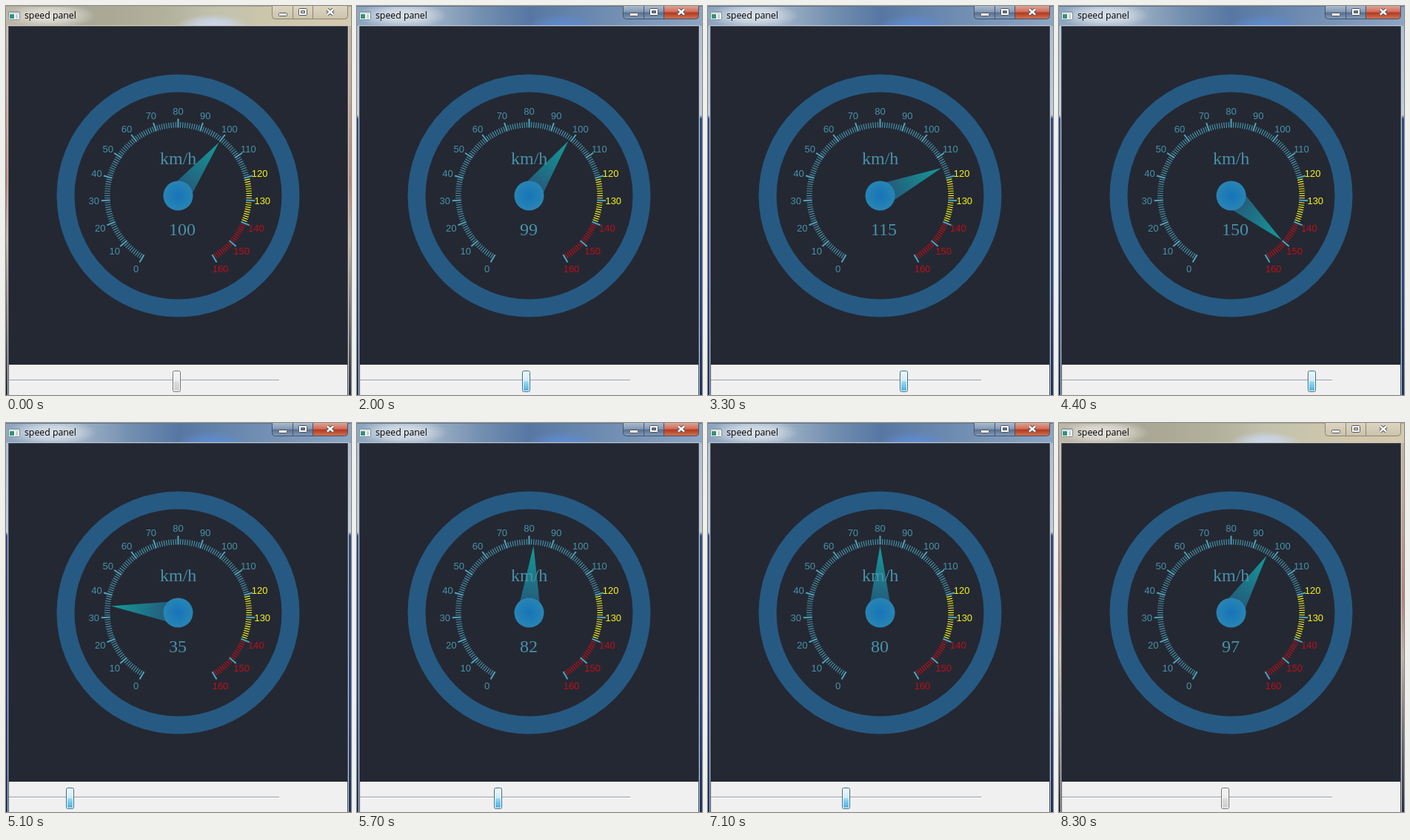
Recreate the animation shown at these times as an HTML page with a canvas. Size 466 px wide and 526 px high, loop 8400 ms.

```html
<!DOCTYPE html>
<html lang="en">
<head>
<meta charset="utf-8">
<title>speed panel</title>
<style>
  html, body { margin: 0; width: 466px; height: 526px; overflow: hidden; }
  canvas { display: block; }
</style>
</head>
<body>
<canvas id="stage" width="466" height="526"></canvas>
<script>
const ctx = document.getElementById('stage').getContext('2d');
const LOOP = 8400, STEP = 100, ACTIVATE = 1000, DEACTIVATE = 8300;
const CX = 232.5, CY = 256.5;
const TEAL = '#4792a8', YELLOW = '#f4f416', RED = '#bd0f18';

// Each drag of the slider: start time and the value at every 100 ms step.
const drags = [
  [2000, [99, 95, 88, 79, 66, 50, 34, 18, 7]],
  [2900, [19, 44, 70, 93, 115, 131, 145, 155, 160]],
  [4400, [150, 139, 122, 104, 89, 70, 50, 35]],
  [5300, [29, 27, 40, 60, 82, 104, 120, 127, 111]],
  [6200, [71, 22, 5, 0]],
  [6800, [9, 32, 58, 80, 97]]
];

function speedAt(t) {
  let speed = 100;
  for (const [start, values] of drags) {
    if (t < start) break;
    speed = values[Math.min(values.length - 1, Math.floor((t - start) / STEP))];
  }
  return speed;
}

const angleOf = speed => (speed - 80) * 1.875 * Math.PI / 180;
const zoneColor = speed => speed < 120 ? TEAL : speed < 140 ? YELLOW : RED;

function gradient(x0, y0, x1, y1, stops) {
  const g = ctx.createLinearGradient(x0, y0, x1, y1);
  stops.forEach(([at, color]) => g.addColorStop(at, color));
  return g;
}

function rect(x, y, w, h, fill) {
  ctx.fillStyle = fill;
  ctx.fillRect(x, y, w, h);
}

function box(x, y, w, h, radii, fill, stroke) {
  ctx.beginPath();
  ctx.roundRect(x + .5, y + .5, w - 1, h - 1, radii);
  ctx.fillStyle = fill;
  ctx.fill();
  ctx.strokeStyle = stroke;
  ctx.lineWidth = 1;
  ctx.stroke();
}

function text(str, x, y, font, color, align = 'left', baseline = 'alphabetic') {
  ctx.font = font;
  ctx.fillStyle = color;
  ctx.textAlign = align;
  ctx.textBaseline = baseline;
  ctx.fillText(str, x, y);
}

function glow(x, y, rx, ry, rgb, alpha) {
  ctx.save();
  ctx.translate(x, y);
  ctx.scale(rx, ry);
  const g = ctx.createRadialGradient(0, 0, 0, 0, 0, 1);
  g.addColorStop(0, `rgba(${rgb},${alpha})`);
  g.addColorStop(.5, `rgba(${rgb},${alpha * .7})`);
  g.addColorStop(1, `rgba(${rgb},0)`);
  rect(-1, -1, 2, 2, g);
  ctx.restore();
}

function drawButtons(active) {
  const edge = active ? '#43536b' : '#898576';
  const face = active
    ? gradient(0, 0, 0, 18, [[0, '#a9bacd'], [.45, '#8398b2'], [.5, '#576f90'], [1, '#879fbd']])
    : gradient(0, 0, 0, 18, [[0, '#ddd5c1'], [1, '#cbc2aa']]);
  const closeFace = active
    ? gradient(0, 0, 0, 18, [[0, '#dfa294'], [.45, '#cb6c57'], [.5, '#b33620'], [1, '#d27a55']])
    : face;
  box(359, -3, 29, 21, [0, 0, 0, 4], face, edge);
  box(387, -3, 28, 21, 0, face, edge);
  box(414, -3, 48, 21, [0, 0, 4, 0], closeFace, edge);

  const ink = '#53565d';
  box(368, 9, 12, 5, 1, '#fff', ink);
  box(395, 3, 12, 10, 1, '#fff', ink);
  box(398, 6, 6, 4, 0, active ? '#62799a' : '#cbc2aa', ink);
  for (const [width, color] of [[4.6, ink], [2.4, '#fff']]) {
    ctx.beginPath();
    ctx.moveTo(434, 4.5); ctx.lineTo(442, 11.5);
    ctx.moveTo(442, 4.5); ctx.lineTo(434, 11.5);
    ctx.lineWidth = width;
    ctx.strokeStyle = color;
    ctx.stroke();
  }
}

function drawWindow(active) {
  const sides = active
    ? [[0, '#a9bace'], [.28, '#c2cddb'], [.29, '#2f4a7c'], [.7, '#2a4682'], [1, '#1d3158']]
    : [[0, '#bfb8a4'], [.2, '#c4a898'], [.45, '#b58377'], [.6, '#beb2a4'], [.9, '#4a4e60'], [1, '#252c44']];
  rect(0, 0, 466, 526, gradient(0, 0, 0, 526, sides));
  const bar = active
    ? [[0, '#8ca4bf'], [.2, '#a3b5c8'], [.36, '#738fb0'], [.5, '#5777a3'], [.7, '#6d8bb0'], [1, '#8ca5c2']]
    : [[0, '#bdb7a7'], [.25, '#a9a795'], [.45, '#b1b09a'], [.6, '#c1c1ac'], [.8, '#cfc7ac'], [1, '#d5c9ae']];
  rect(0, 0, 466, 27, gradient(0, 0, 466, 0, bar));

  ctx.save();
  ctx.beginPath();
  ctx.rect(0, 0, 466, 27);
  ctx.clip();
  glow(279, 27, 48, 16, active ? '94,139,210' : '205,218,250', .9);
  glow(60, 13, 62, 17, '255,255,255', .65);
  ctx.restore();

  rect(0, 0, 466, 1, active ? '#5f7590' : '#a9a594');
  rect(2, 26, 461, 500, active ? '#bccbdc' : '#d6d0c1');
  rect(3, 27, 459, 499, '#4a4d55');

  box(3, 7, 16, 12, 1, '#f8faf9', '#7b8b93');
  rect(4, 8, 14, 2, '#b8c6cc');
  rect(5, 11, 6, 6, '#379179');
  rect(13, 11, 3, 6, '#c5d1d4');
  text('speed panel', 25, 17, '12.3px "Open Sans", sans-serif', '#000');
  drawButtons(active);
}

function drawDial() {
  rect(4, 28, 457, 457, '#242833');
  ctx.beginPath();
  ctx.arc(CX, CY, 152, 0, 2 * Math.PI);
  ctx.lineWidth = 24;
  ctx.strokeStyle = '#265a83';
  ctx.stroke();

  for (let speed = 0; speed <= 160; speed++) {
    const major = speed % 10 === 0, a = angleOf(speed);
    ctx.save();
    ctx.translate(CX, CY);
    ctx.rotate(a);
    const w = major ? 2 : 1.2;
    rect(-w / 2, major ? -104 : -99.5, w, major ? 12 : 7.5, major ? '#50a4bc' : zoneColor(speed));
    ctx.restore();
    if (major) {
      text(speed, CX + 114 * Math.sin(a), CY - 114 * Math.cos(a) + 4.5,
        '13px "Liberation Sans", Arial, sans-serif', zoneColor(speed), 'center');
    }
  }
}

function drawNeedle(speed) {
  ctx.save();
  ctx.translate(CX, CY);
  ctx.rotate(angleOf(speed));
  ctx.beginPath();
  ctx.moveTo(-15.8, 0);
  ctx.lineTo(0, -91);
  ctx.lineTo(15.8, 0);
  ctx.fillStyle = gradient(0, 0, 0, -91, [[0, '#265a83'], [.2, '#235f7d'], [1, '#139c99']]);
  ctx.fill();
  ctx.restore();

  const hub = ctx.createRadialGradient(CX, CY, 0, CX, CY, 20);
  hub.addColorStop(0, '#1674ba');
  hub.addColorStop(1, '#2885b3');
  ctx.beginPath();
  ctx.arc(CX, CY, 20, 0, 2 * Math.PI);
  ctx.fillStyle = hub;
  ctx.fill();

  const serif = '24px "Liberation Serif", Times, serif';
  text('km/h', 208, 214, serif, TEAL);
  text(speed, 220, 310, serif, TEAL);
}

function drawSlider(speed, active) {
  rect(4, 485, 457, 41, '#f0f0f0');
  rect(4, 505, 365, 1, '#aeb3b9');
  rect(4, 506, 365, 1, '#d6d9dc');
  rect(4, 507, 365, 1, '#fafafa');
  const x = Math.round(3.4 + 2.22 * speed);
  const face = active
    ? [[0, '#edf8fd'], [.48, '#d0ecfa'], [.52, '#9cd8f3'], [1, '#4fb2dc']]
    : [[0, '#f5f5f5'], [.48, '#ececec'], [.52, '#dcdcdc'], [1, '#cfcfcf']];
  box(x, 493, 11, 29, 2, '#fff', active ? '#2f6d8e' : '#707070');
  rect(x + 2, 495, 7, 25, gradient(0, 495, 0, 520, face));
}

function draw(now) {
  const t = now % LOOP;
  const active = t >= ACTIVATE && t < DEACTIVATE;
  const speed = speedAt(t);
  drawWindow(active);
  drawDial();
  drawNeedle(speed);
  drawSlider(speed, active);
  requestAnimationFrame(draw);
}
requestAnimationFrame(draw);
</script>
</body>
</html>
```
